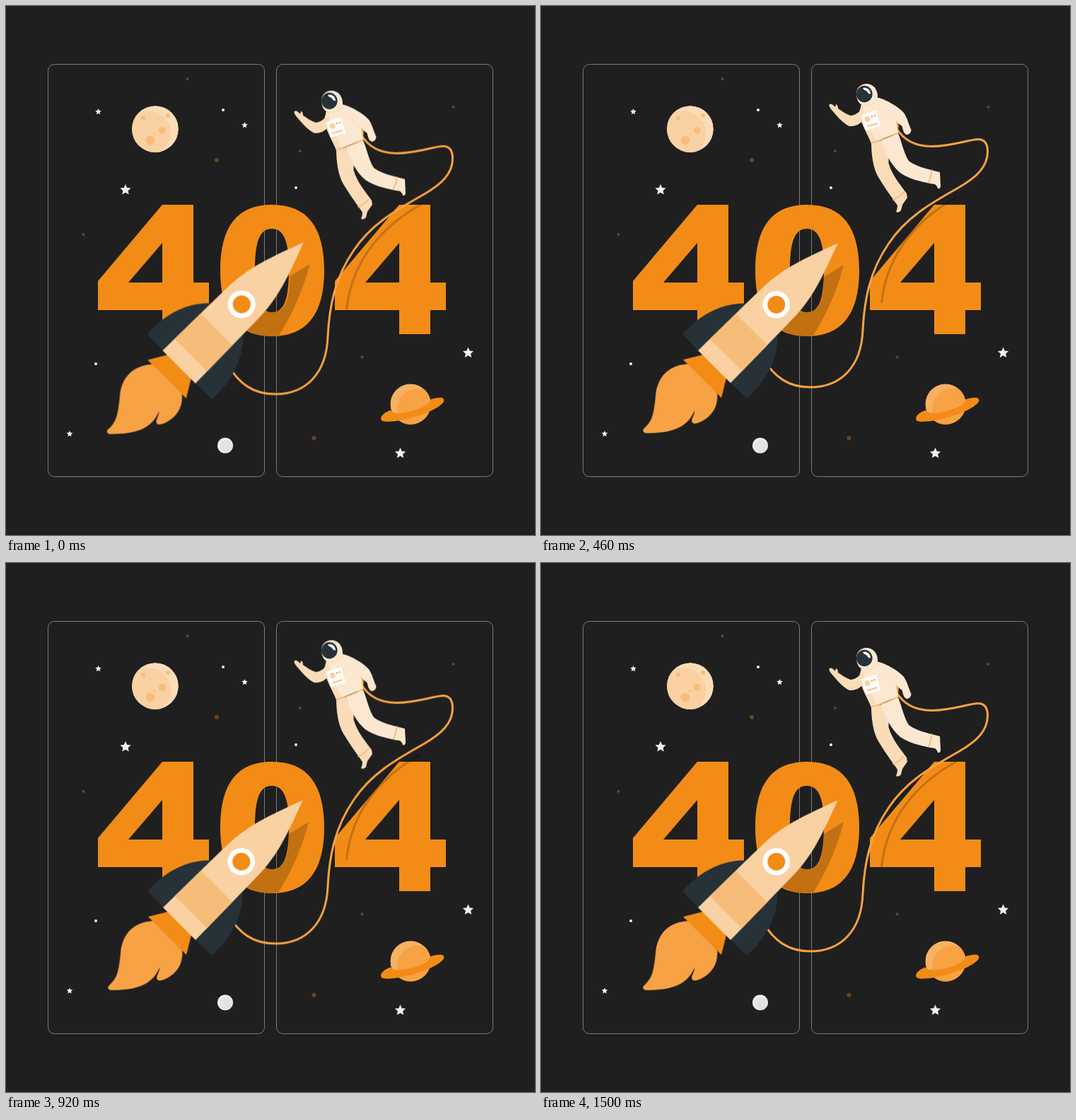
An HTML page for the animation above (1540 ms loop, 748 by 748 pixels).

```html
<!DOCTYPE html>
<html lang="en">
<head>
<meta charset="utf-8">
<title>404</title>
<style>
  html, body { margin: 0; width: 100%; height: 100%; overflow: hidden; background: #1f1f1f; }
  svg { display: block; width: 100vw; height: 100vh; }

  .orange { fill: #f28c17; }
  .amber { fill: #f7a244; }
  .dark { fill: #263238; }
  .suit { fill: #fce8d1; }
  .suit-shade { fill: #fadcb9; }
  .trim { fill: none; stroke: #f6bd7a; stroke-width: 2; }
  .shade { fill: #000; opacity: .2; }
  .panel { fill: none; stroke: #ebebeb; stroke-width: .45; }
  .dim { fill: #f28c17; opacity: .36; }
  .white { fill: #f0f0f0; }

  /* One loop is 37 ticks; every segment advances once per tick. */
  .float, .pulse { animation: 1540ms -4ms infinite; }
  .float { animation-name: float; }
  .pulse { animation-name: pulse; transform-origin: 282px 470px; }

  @keyframes float {
    0%       { transform: translateY(-.3px);   animation-timing-function: steps(1); }
    2.7027%  { transform: translateY(-1.67px); animation-timing-function: steps(16); }
    45.9459% { transform: translateY(-15px);   animation-timing-function: steps(18); }
    94.5946%, 100% { transform: translateY(0); }
  }
  @keyframes pulse {
    0%       { transform: scale(1.01);  animation-timing-function: steps(1); }
    2.7027%  { transform: scale(1.056); animation-timing-function: steps(1); }
    5.4054%  { transform: scale(1.083); animation-timing-function: steps(1); }
    8.1081%  { transform: scale(1.095); animation-timing-function: steps(1); }
    10.8108% { transform: scale(1.079); animation-timing-function: steps(6); }
    27.027%  { transform: scale(1); }
    35.1351% { transform: scale(1);     animation-timing-function: steps(1); }
    37.8378% { transform: scale(1.017); animation-timing-function: steps(3); }
    45.9459% { transform: scale(1.1);   animation-timing-function: steps(2); }
    51.3514% { transform: scale(1.056); animation-timing-function: steps(2); }
    56.7568%, 100% { transform: scale(1); }
  }
</style>
</head>
<body>
<svg viewBox="0 0 748 748" role="img" aria-label="404">
  <defs>
    <path id="star" d="M0-8 2.2-3.1 7.6-2.5 3.6 1.2 4.7 6.5 0 3.8-4.7 6.5-3.6 1.2-7.6-2.5-2.2-3.1Z"/>
    <path id="four" fill-rule="evenodd" d="M221 281H265V391H287V430H265V464H221V430H130V389ZM221 335 173 391H221Z"/>
    <path id="fin" d="M-186.700-64.300C-153.400-66.500-116.700-58-92-31V-25H-187.400V-32.500Z"/>
    <clipPath id="moon-clip"><circle cx="211" cy="174" r="33"/></clipPath>
    <clipPath id="ringed-clip"><circle cx="572" cy="563" r="28.7"/></clipPath>
  </defs>

  <rect class="panel" x="59.5" y="82.5" width="306" height="583" rx="9"/>
  <rect class="panel" x="382.5" y="82.5" width="306" height="583" rx="9"/>

  <g class="dim">
    <circle cx="256.500" cy="103" r="2"/>
    <circle cx="298" cy="218" r="3"/>
    <circle cx="109.500" cy="323" r="2"/>
    <circle cx="416" cy="205" r="2"/>
    <circle cx="632.500" cy="143" r="2"/>
    <circle cx="503.500" cy="496.500" r="2"/>
    <circle cx="435.500" cy="611" r="3"/>
  </g>
  <g class="white">
    <circle cx="307" cy="147" r="2"/>
    <circle cx="410" cy="257" r="2"/>
    <circle cx="127" cy="506" r="2"/>
    <use href="#star" transform="translate(169 260)"/>
    <use href="#star" transform="translate(653.5 490.500)"/>
    <use href="#star" transform="translate(557.5 632.500)"/>
    <use href="#star" transform="translate(130.500 149.500) scale(.56)"/>
    <use href="#star" transform="translate(337.500 168.500) scale(.56)"/>
    <use href="#star" transform="translate(90 605) scale(.56)"/>
    <circle cx="310" cy="621.500" r="11"/>
    <circle cx="311" cy="622.500" r="9" fill="#e3e3e3"/>
  </g>

  <!-- moon -->
  <g clip-path="url(#moon-clip)">
    <circle cx="211" cy="174" r="33" fill="#fbdcb9"/>
    <circle cx="201" cy="180" r="32" fill="#fad1a2"/>
    <g fill="#f6bd7a">
      <circle cx="204" cy="190" r="6.500"/>
      <circle cx="221" cy="176" r="5"/>
      <circle cx="194" cy="158" r="3"/>
      <circle cx="229" cy="155" r="3"/>
      <circle cx="210" cy="181" r="1.500"/>
    </g>
  </g>

  <!-- ringed planet -->
  <g clip-path="url(#ringed-clip)">
    <circle cx="572" cy="563" r="28.7" fill="#f8b062"/>
    <circle cx="582" cy="570" r="29" class="amber"/>
  </g>
  <path class="orange" d="M544 571.500C533 575 528 582 531 586 535 590 560 587 584 579 608 571 622 561 619 556 617 552 608 554 600.500 556 601 561 592 567 578 571.500 561 577 546 577 544 571.500Z"/>

  <use href="#four" class="orange"/>
  <use href="#four" class="orange" x="335"/>
  <path class="orange" fill-rule="evenodd" d="M303 374C303 312 327 281 376 281 427 281 450 314 450 374 450 436 425 467 376 467 324 467 303 430 303 374ZM352 374C352 417 360 433 376 433 393 433 400 416 400 372 400 331 392 315 376 315 359 315 352 332 352 374Z"/>

  <g class="float">
    <path fill="none" stroke="#000" stroke-opacity=".2" stroke-width="3" d="M587 281C536 309 489 357 481.500 430"/>
    <path fill="none" stroke="#f7a244" stroke-width="3" d="M502 182C514 202 533 208.500 552 208.500 582 208.500 605 198.500 618 198.500 628 198.500 631.500 205 631.500 216 631.500 238 615 252.500 591 266.500 559 285 519 305 491.500 346 464 386 457 428 455 468 453 520 424 549 381 549 350 549 330 535 314 508"/>

    <!-- astronaut -->
    <path class="amber" d="M490 162 503 169Q508 178 504 188L497 193Z"/>
    <path class="suit-shade" d="M467 202C467 222 470 240 477 252 484 264 492 275 500.500 287L504 292Q504 297 502 301 506 303 509 299L511 291 518 281 517 275C509 264 496 249 491.500 232L492 200Z"/>
    <path class="trim" d="M497.500 284.500Q508 280 513 273"/>
    <path class="suit" d="M481 199C485 216 495 235 508 246 519 254 536 258 550 261L557 262Q560 264 561 268 565 269 565 264L564 245 552 242C540 239 528 235 520 229 513 218 510 202 505 190Z"/>
    <path class="trim" d="M552.500 241.500Q552 252 547.500 260"/>
    <path class="suit-shade" d="M456 153C450 160 446 164 438 165 431 163 425 158 420 155Q420 150 417 149L416 153Q411 147 408 149 406 151 411 157C418 165 426 175 436 180 446 181 454 175 459 167Z"/>
    <path class="suit" d="M453 150 475 140C487 143 498 152 501 166L505 189 467 204C462 190 451 174 450 160Z"/>
    <path class="suit-shade" d="M450 160C452 177 462 191 467 204L474 201C467 185 458 168 456 153Z"/>
    <path class="trim" d="M466.500 203.500Q488 199 505 189"/>
    <path class="suit" d="M474 139C486 141 505 152 513 161 518 168 520 178 523.500 185 523 190 520 192 517 192L514 190 512 186 511 180C505 175 498 168 490 161Z"/>
    <path fill="none" stroke="#fadcb9" d="M489 160Q499 172 511 180M511 181 514 187"/>
    <g transform="translate(466.500 172) rotate(-17)">
      <rect x="-11" y="-11.500" width="22" height="23" fill="#fff"/>
      <circle cx="-4" cy="-3.500" r="4" fill="#fad1a2"/>
      <circle cx="3" cy="-5" r="1.300" class="amber"/>
      <circle cx="7" cy="-5" r="1.300" class="amber"/>
      <path class="trim" d="M-7.500 6.500H7.500"/>
    </g>
    <path class="suit" d="M446 134C446 125 453 120 460 120 470 120 476 128 476 138 476 147 468 152 460 152 451 151 446 144 446 134Z"/>
    <path fill="none" stroke="#fadcb9" stroke-width="1.500" d="M452 151Q467 153 476 142"/>
    <ellipse class="dark" cx="457.300" cy="134.500" rx="11.300" ry="11.800"/>
    <path fill="#fff" d="M455 126C460 124 466 128 466 134 464 135 462 133 461 131 459 129 456 129 455 126Z"/>
  </g>

  <g class="pulse">
    <path class="shade" d="M428 366 400 383C400 415 394 433 376 433L355 430 330 452C343 462 358 467 376 467L385 466C403 437 418 405 428 366Z"/>
    <path class="amber" d="M215 506C181 505 164 524 162 552 159 580 157 587 145 598 143 601 145 604 149 604 178 604 206 600 217 572 217 580 211 585 214 589 216 592 222 590 228 587 243 579 251 564 249 548Z"/>
    <path class="orange" d="M201 500 229 493 262 526 255 554Z"/>
    <!-- hull, drawn along its own axis -->
    <g transform="translate(377.500 377.500) rotate(-45)">
      <use href="#fin" class="dark"/>
      <use href="#fin" class="dark" transform="scale(1 -1)"/>
      <path fill="#fad1a2" d="M-187.400-32.500-113-31.500C-80-31-55-31-42-29.500-15-26.500 7-20 59.400 0 7 20-15 26.500-42 29.500-55 31-80 31-113 31.500L-187.400 32.500Z"/>
      <path fill="#f6bd7a" d="M-164-32.200-113-31.500V31.500L-164 32.200Z"/>
      <circle cx="-63.300" r="19.300" fill="#fff"/>
      <circle cx="-63.300" r="12.500" class="orange"/>
    </g>
  </g>
</svg>
</body>
</html>
```
